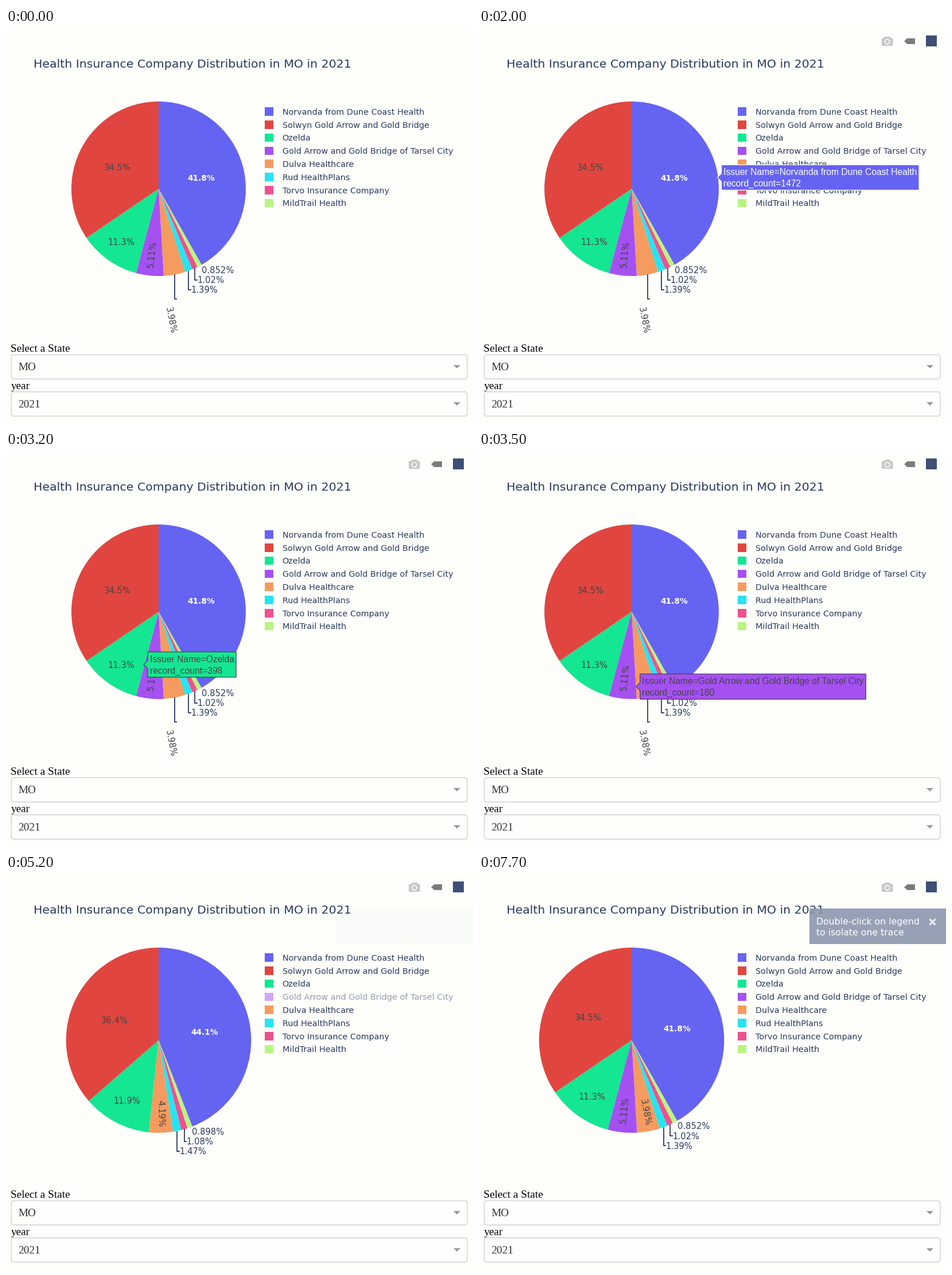
Animation, 814 px wide and 688 px high, one loop 8 s. Source, as a matplotlib script:

```python
import numpy as np
import matplotlib.pyplot as plt
from matplotlib.animation import FuncAnimation
from matplotlib.patches import Circle, FancyBboxPatch, Polygon, Rectangle, Wedge

W, H, DPI = 814, 688, 64
STEP, FRAMES = 100, 80
PT = 72 / DPI

BG, INK, DARK = "#fefffb", "#2a3a60", "#444444"
SANS, ARIAL, SERIF = "DejaVu Sans", "Liberation Sans", "Liberation Serif"

# name, count, colour; slices run clockwise in DRAW_ORDER
ISSUERS = [
    ("Norvanda from Dune Coast Health", 1472, "#6564f2"),
    ("Solwyn Gold Arrow and Gold Bridge", 1215, "#e0463f"),
    ("Ozelda", 398, "#14e692"),
    ("Gold Arrow and Gold Bridge of Tarsel City", 180, "#a551f2"),
    ("Dulva Healthcare", 140, "#f59b5f"),
    ("Rud HealthPlans", 49, "#28e4f0"),
    ("Torvo Insurance Company", 36, "#ee528e"),
    ("MildTrail Health", 30, "#b9f482"),
]
BLUE, RED, GREEN, PURPLE, ORANGE, CYAN, PINK, LIME = range(8)
DRAW_ORDER = [BLUE, LIME, PINK, CYAN, ORANGE, PURPLE, GREEN, RED]

fig = plt.figure(figsize=(W / DPI, H / DPI), dpi=DPI, facecolor=BG)
ax = fig.add_axes([0, 0, 1, 1])
ax.set_xlim(0, W)
ax.set_ylim(H, 0)
ax.axis("off")


def text(x, y, s, size, color=INK, font=SANS, z=3, **kw):
    kw.setdefault("va", "baseline")
    return ax.text(x, y, s, fontsize=size * PT, color=color, family=font,
                   zorder=z, **kw)


def line(xs, ys, color=INK, width=1.8, z=3):
    return ax.plot(xs, ys, color=color, lw=width * PT, zorder=z,
                   solid_capstyle="butt", solid_joinstyle="miter")[0]


def shape(patch, color, z=2, edge="none", width=0):
    patch.set(facecolor=color, edgecolor=edge, linewidth=width * PT, zorder=z)
    return ax.add_patch(patch)


def rect(x0, y0, x1, y1, color, z=2):
    return shape(Rectangle((x0, y0), x1 - x0, y1 - y0), color, z)


class Pie:
    """Pie geometry; angles are radians clockwise from the top."""

    def __init__(self, cx, cy, r, hidden=()):
        self.cx, self.cy, self.r = cx, cy, r
        self.order = [i for i in DRAW_ORDER if i not in hidden]
        self.total = sum(ISSUERS[i][1] for i in self.order)
        self.span, a = {}, 0
        for i in self.order:
            b = a + 2 * np.pi * ISSUERS[i][1] / self.total
            self.span[i] = a, b
            a = b

    def mid(self, i):
        return sum(self.span[i]) / 2

    def point(self, i, k=1.0):
        a = self.mid(i)
        return (self.cx + k * self.r * np.sin(a),
                self.cy - k * self.r * np.cos(a))

    def inscribed(self, i):
        """Radius, as a share of r, of the circle that fits the slice."""
        a, b = self.span[i]
        s = np.sin((b - a) / 2)
        return s / (1 + s)

    def label(self, i):
        return f"{100 * ISSUERS[i][1] / self.total:.3g}%"

    def draw(self, orange_outside=False):
        art = []
        for i in self.order:
            a, b = np.degrees(self.span[i]) - 90
            art.append(shape(Wedge((self.cx, self.cy), self.r, a, b),
                             ISSUERS[i][2], 1))
        mid = dict(ha="center", va="center_baseline")
        for i in (BLUE, RED, GREEN):
            x, y = self.point(i, 1 - self.inscribed(i))
            style = dict(size=13.8, color="white", weight="bold") \
                if i == BLUE else dict(size=14.7, color=DARK)
            art.append(text(x, y, self.label(i), **style, **mid))

        turned = dict(ha="center", va="center", rotation_mode="default")
        for i, k, turn in ((PURPLE, .758, 270), (ORANGE, .79, 90)):
            if i not in self.span:
                continue
            x, y = self.point(i, k)
            if i == ORANGE and orange_outside:
                ex, ey = self.point(i)
                art.append(line([ex, ex, ex + 4.5],
                                [ey, ey + 42.5, ey + 42.5]))
                x, y = ex - 7.5, ey + 80
            art.append(text(x, y, self.label(i), 14.7, DARK,
                            rotation=turn - np.degrees(self.mid(i)), **turned))

        ly = self.point(LIME)[1] + 7
        for n, i in enumerate((LIME, PINK, CYAN)):
            x, y = self.point(i)
            if n:
                art.append(line([x, x, x + 4.5], [y, ly, ly]))
            art.append(text(x + 4, ly + 5.3, self.label(i), 14.7))
            ly += 17.2
        return art


def tooltip(pie, i):
    name, count, color = ISSUERS[i]
    ink = "white" if i == BLUE else DARK
    x, y = pie.point(i, 1 - pie.inscribed(i))
    x += pie.inscribed(i) * pie.r
    left = x + 7
    rows = [text(left + 3.6, y + dy, s, 15.6, ink, ARIAL, z=7)
            for dy, s in ((-4.3, f"Issuer Name={name}"),
                          (15.7, f"record_count={count}"))]
    renderer = fig.canvas.get_renderer()
    right = left + 7.2 + max(r.get_window_extent(renderer).width for r in rows)
    top, low = y - 22, y + 22
    outline = [(x, y), (left, y - 7), (left, top), (right, top),
               (right, low), (left, low), (left, y + 7)]
    return [shape(Polygon(outline), color, 6, ink, 1.2)] + rows


def legend():
    rows = []
    for i, (name, _, color) in enumerate(ISSUERS):
        y = 145.5 + 22.8 * i
        rows.append([rect(451, y - 7.3, 465.5, y + 7.3, color),
                     text(481.5, y + 5.4, name, 14.4)])
    return rows


def modebar():
    grey = "#c7c7c6"
    return [
        rect(706.5, 15, 716.5, 20, grey),
        shape(FancyBboxPatch((703.5, 19), 16.5, 10.5,
                             boxstyle="round,pad=1.5,rounding_size=1.5"), grey),
        shape(Circle((711.7, 24), 5), BG, 3),
        shape(Circle((711.7, 24), 3.4), grey, 4),
        shape(Polygon([(741, 23), (746.5, 18), (760, 18), (760, 28),
                       (746.5, 28)]), "#7b7b7b"),
        rect(779, 13.3, 798, 32.3, "#3f4f75"),
    ]


def toast():
    return [
        rect(576, 60, W, 122, "#8c97af", 8),
        text(588, 88, "Double-click on legend", 15.8, "white", z=9),
        text(588, 107, "to isolate one trace", 15.8, "white", z=9),
        line([785.5, 795.5], [78.5, 88.5], "#eceef2", 3, 9),
        line([785.5, 795.5], [88.5, 78.5], "#eceef2", 3, 9),
    ]


def dropdown(y, caption, value):
    text(8.5, y - 5, caption, 19.2, "black", SERIF)
    shape(FancyBboxPatch((9.2, y), 794.8, 42.3,
                         boxstyle="round,pad=0,rounding_size=4.8"),
          BG, 1, "#cccccc", 1.3)
    text(21.5, y + 27.5, value, 19.2, "#333333", SERIF)
    shape(Polygon([(780, y + 18), (792, y + 18), (786, y + 24)]), "#999999")


text(48, 69, "Health Insurance Company Distribution in MO in 2021", 20.45)
dropdown(569, "Select a State", "MO")
dropdown(633.7, "year", "2021")

first = Pie(266, 280, 152)
charts = [
    (0, 5100, first.draw(orange_outside=True)),
    (5100, 7500, Pie(266, 289.5, 161.3, hidden=[PURPLE]).draw()),
    (7500, 8000, Pie(266, 289.5, 161.3).draw()),
]
blue_tip = tooltip(first, BLUE)
tips = [
    (blue_tip, [(1600, 3200), (3700, 3800)]),
    (tooltip(first, GREEN), [(3200, 3400)]),
    (tooltip(first, PURPLE), [(3400, 3600)]),
    (tooltip(first, ORANGE), [(3600, 3700)]),
]
keys, tools, notice = legend(), modebar(), toast()


def show(group, on):
    for a in group:
        a.set_visible(on)


def fade(group, alpha):
    for a in group:
        a.set_alpha(alpha)


def ease(u):
    u = min(max(u, 0), 1)
    return 4 * u ** 3 if u < .5 else 1 - 4 * (1 - u) ** 3


def update(n):
    t = n * STEP
    for start, end, art in charts:
        show(art, start <= t < end)
    for art, spans in tips:
        show(art, any(a <= t < b for a, b in spans))
    fade(keys[PURPLE], .5 if 5100 <= t < 7500 else 1)
    fade(tools, min(max((t - 50) / 300, 0), 1))
    seen = ease((t - 5050) / 700)
    fade(notice, seen)
    notice[0].set_alpha(.9 * seen)
    return []


anim = FuncAnimation(fig, update, frames=FRAMES, interval=STEP,
                     init_func=lambda: update(0), repeat=True,
                     repeat_delay=0, blit=False)
plt.show()
```
